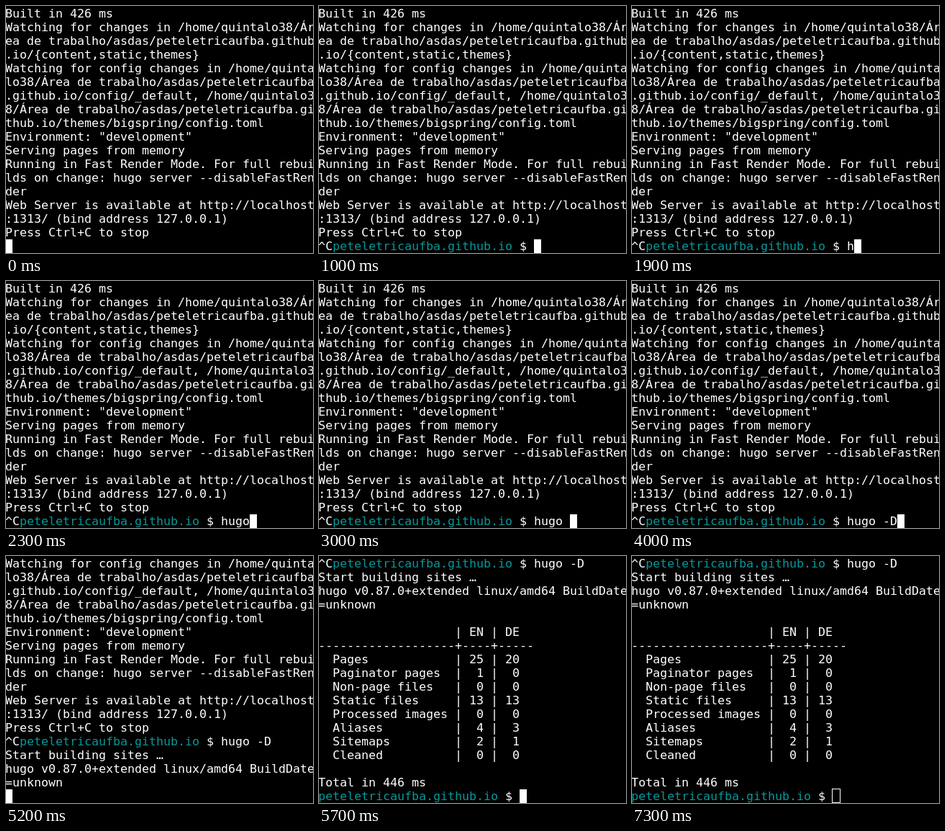
Write an HTML page that moves like this. It is 427 by 343 pixels and loops after 7400 ms.

```html
<!DOCTYPE html>
<html lang="en">
<head>
<meta charset="utf-8">
<title>Terminal site build</title>
<style>
  html, body { margin: 0; width: 100%; height: 100%; overflow: hidden; background: #000; }
  svg { display: block; }
  text { font: 16.6px "DejaVu Sans Mono", monospace; white-space: pre; fill: #fff; }
  .site { fill: #06989a; }
</style>
</head>
<body>
<svg id="screen" width="427" height="343" viewBox="0 0 427 343">
  <rect width="427" height="343" fill="#000"/>
  <g id="rows"></g>
  <rect id="block" width="10" height="19" fill="#fff"/>
  <rect id="hollow" width="11" height="19" fill="none" stroke="#fff"/>
</svg>
<script>
const LOOP = 7400, COLS = 43, ROWS = 18, CELL_W = 10, CELL_H = 19;
const NS = "http://www.w3.org/2000/svg";
const $ = id => document.getElementById(id);

const site = "peteletricaufba.github.io";
const home = "/home/quintalo38/Área de trabalho/asdas/" + site;
const prompt = site + " $ ";

const wrap = line => line.match(new RegExp(`.{1,${COLS}}`, "gu")) || [""];

const server = [
  "Built in 426 ms",
  `Watching for changes in ${home}/{content,static,themes}`,
  `Watching for config changes in ${home}/config/_default, ${home}/themes/bigspring/config.toml`,
  'Environment: "development"',
  "Serving pages from memory",
  "Running in Fast Render Mode. For full rebuilds on change: hugo server --disableFastRender",
  "Web Server is available at http://localhost:1313/ (bind address 127.0.0.1)",
  "Press Ctrl+C to stop"
];

const build = [
  "Start building sites …",
  "hugo v0.87.0+extended linux/amd64 BuildDate=unknown"
];

const tableRow = (label, en, de) =>
  "  " + label.padEnd(17) + "| " + String(en).padStart(2) + " | " + String(de).padStart(2);

const report = [
  "",
  tableRow("", "EN", "DE"),
  "-".repeat(19) + "+----+-----",
  tableRow("Pages", 25, 20),
  tableRow("Paginator pages", 1, 0),
  tableRow("Non-page files", 0, 0),
  tableRow("Static files", 13, 13),
  tableRow("Processed images", 0, 0),
  tableRow("Aliases", 4, 3),
  tableRow("Sitemaps", 2, 1),
  tableRow("Cleaned", 0, 0),
  "",
  "Total in 446 ms",
  prompt
];

// Moment each key of the command lands
const command = "hugo -D";
const keyTimes = [1900, 2000, 2200, 2300, 3000, 3300, 4000];
const STOP = 1000, START_BUILD = 5200, DONE = 5700, BLUR = 7300;

function linesAt(t) {
  const typed = command.slice(0, keyTimes.filter(k => k <= t).length);
  const lines = [...server, t < STOP ? "" : "^C" + prompt + typed];
  if (t >= START_BUILD) lines.push(...build);
  if (t >= DONE) lines.push(...report);
  else if (t >= START_BUILD) lines.push("");
  return lines.flatMap(wrap).slice(-ROWS);
}

function addText(str, col, row, cls) {
  if (!str.trim()) return;
  const el = document.createElementNS(NS, "text");
  el.setAttribute("x", [...str].map((_, i) => (col + i) * CELL_W - 1).join(" "));
  el.setAttribute("y", row * CELL_H + 16);
  if (cls) el.setAttribute("class", cls);
  el.textContent = str;
  $("rows").append(el);
}

function drawRow(line, row) {
  const at = line.indexOf(prompt);
  if (at < 0) return addText(line, 0, row);
  const end = at + site.length;
  addText(line.slice(0, at), 0, row);
  addText(site, at, row, "site");
  addText(line.slice(end), end, row);
}

function place(id, x, y, shown) {
  const el = $(id);
  el.setAttribute("x", x);
  el.setAttribute("y", y);
  el.setAttribute("visibility", shown ? "visible" : "hidden");
}

let last = "";
function render(t) {
  const lines = linesAt(t), blurred = t >= BLUR;
  const key = lines.join("\n") + blurred;
  if (key === last) return;
  last = key;
  $("rows").replaceChildren();
  lines.forEach(drawRow);
  const x = lines[ROWS - 1].length * CELL_W - 1;
  const y = (ROWS - 1) * CELL_H + 1;
  place("block", x, y, !blurred);
  place("hollow", x - 0.5, y - 0.5, blurred);
}

const begin = performance.now();
function tick() {
  render((performance.now() - begin) % LOOP);
  requestAnimationFrame(tick);
}
tick();
</script>
</body>
</html>
```
